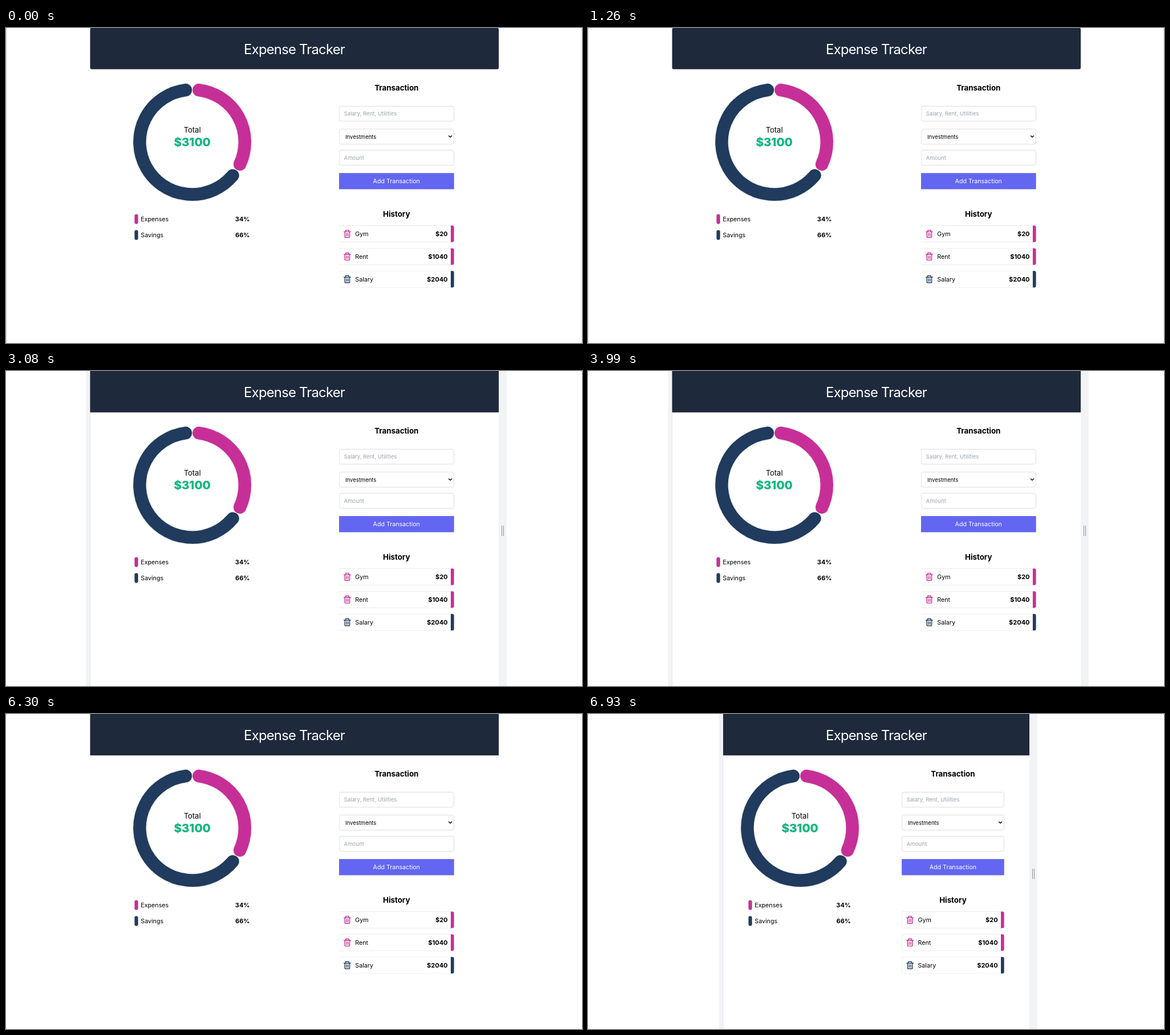
Animation of 1010 by 554 pixels, one loop 8000 ms. Source, as an HTML page:

```html
<!DOCTYPE html>
<html lang="en">
<head>
<meta charset="utf-8">
<title>Expense Tracker</title>
<style>
  html, body { margin: 0; width: 100%; height: 100%; overflow: hidden; background: #888; }
  svg { display: block; width: 1010px; height: 554px; }
  text { font-family: Inter, Roboto, sans-serif; font-optical-sizing: none; fill: #000; }
  .lift { filter: drop-shadow(0 .7px .7px rgba(0, 0, 0, .3)); }
  .ring { filter: drop-shadow(0 .7px .6px rgba(0, 0, 0, .32)); }
</style>
</head>
<body>
<svg id="stage" viewBox="0 0 1010 554"></svg>
<script>
const LOOP = 8000;
const PINK = '#c62f97', NAVY = '#203b5d', GREEN = '#10b981', HINT = '#9ca3af';
const RING = { cy: 200.5, r: 92.2, width: 22.5, gap: 7.3 };
const CENTER = 505.6;

// left/right page edges, ring centre, legend span, form span
const WIDE = { left: 147.5, right: 864, ring: 326.6, legend: [225.5, 427.5], form: [584, 785.5] };
const NARROW = { left: 237, right: 774, ring: 371.6, legend: [281.5, 461], form: [550.2, 729.6] };

const SHARES = [['Expenses', 34, PINK], ['Savings', 66, NAVY]];
const HISTORY = [['Gym', '$20', PINK], ['Rent', '$1040', PINK], ['Salary', '$2040', NAVY]];
const TRASH = 'M5 20a2 2 0 0 0 2 2h10a2 2 0 0 0 2-2V8h2V6h-4V4a2 2 0 0 0-2-2H9a2 2 0 0 0-2 2v2H3v2h2z' +
  'M9 4h6v2H9zM7 8h10v12H7zM9 10h2v8H9zM13 10h2v8h-2z';

const stage = document.getElementById('stage');

const rect = (x, y, w, h, fill, extra = '') =>
  `<rect x="${x}" y="${y}" width="${w}" height="${h}" fill="${fill}" ${extra}/>`;

const text = (s, x, y, size, { anchor = 'start', weight = 400, fill = '#000', spacing = 0 } = {}) =>
  `<text x="${x}" y="${y}" font-size="${size}" text-anchor="${anchor}" font-weight="${weight}"
    style="fill:${fill};letter-spacing:${spacing}px">${s}</text>`;

function arc(cx, from, to) {
  const point = deg => {
    const a = deg * Math.PI / 180;
    return `${cx + RING.r * Math.sin(a)} ${RING.cy - RING.r * Math.cos(a)}`;
  };
  return `M${point(from)}A${RING.r} ${RING.r} 0 ${to - from > 180 ? 1 : 0} 1 ${point(to)}`;
}

function doughnut(cx) {
  let start = 0, under = '', over = '';
  for (const [, share, color] of SHARES) {
    const end = start + share * 3.6;
    const d = arc(cx, start + RING.gap, end - RING.gap);
    under += `<path d="${d}" stroke="#fff" stroke-width="${RING.width + 2.4}"/>`;
    over += `<path d="${d}" stroke="${color}" stroke-width="${RING.width}"/>`;
    start = end;
  }
  return `<g fill="none" stroke-linecap="round"><g class="ring">${under}</g>${over}</g>` +
    text('Total', cx, 184, 13, { anchor: 'middle' }) +
    `<g class="lift">${text('$3100', cx, 208, 20.5, { anchor: 'middle', weight: 800, fill: GREEN })}</g>`;
}

function legend([x, right]) {
  return SHARES.map(([name, share, color], i) => {
    const y = 327.5 + i * 28;
    return rect(x, y, 6, 17, color, 'rx="2.8" class="lift"') +
      text(name, x + 10.8, y + 12.5, 10.7) +
      text(share + '%', right, y + 12.5, 11, { anchor: 'end', weight: 700 });
  }).join('');
}

function form([x, right]) {
  const w = right - x, mid = x + w / 2;
  const heading = (s, y) => text(s, mid, y, 13.3, { anchor: 'middle', weight: 700 });
  const field = y => rect(x + .35, y, w - .7, 26, '#fff', 'rx="3" stroke="#e5e7eb" stroke-width=".7" class="lift"');
  const row = ([name, amount, color], i) => {
    const y = 347.5 + i * 39.9;
    return rect(x, y, w, 29, '#fff', 'rx="2.5" class="lift"') +
      `<path d="M${right - 5.6} ${y}h2.8a2.8 2.8 0 0 1 2.8 2.8v23.4a2.8 2.8 0 0 1-2.8 2.8h-2.8z" fill="${color}"/>` +
      `<path d="${TRASH}" transform="translate(${x + 6} ${y + 6}) scale(.7)" fill="${color}" fill-rule="evenodd"/>` +
      text(name, x + 28.3, y + 18.4, 10.7) +
      text(amount, right - 11, y + 18.4, 11, { anchor: 'end', weight: 700 });
  };
  return heading('Transaction', 109.7) +
    field(137.7) + text('Salary, Rent, Utilities', x + 8.6, 154, 9.6, { fill: HINT }) +
    field(178) + text('Investments', x + 11, 194.5, 9.5) +
    `<path d="M${right - 9.4} 189.2l2.9 2.9 2.9-2.9" fill="none" stroke="#000" stroke-width="1.4"/>` +
    field(215.2) + text('Amount', x + 8.6, 231.7, 9.6, { fill: HINT }) +
    rect(x, 255.2, w, 28.2, '#6366f1', 'class="lift"') +
    text('Add Transaction', mid, 273.4, 10.65, { anchor: 'middle', fill: '#fff' }) +
    heading('History', 331.6) + HISTORY.map(row).join('');
}

// Resize strips either side of the page, with a grip on the right
function gutters({ left, right }, opacity) {
  const grip = x => rect(right + x, 272, 1, 18, '#8f9399');
  return `<g opacity="${opacity}">` +
    rect(left - 7.3, 0, 7.3, 554, '#f2f3f5') + rect(left - .5, 0, .8, 554, '#e0e2e5') +
    rect(right, 0, 13.6, 554, '#f2f3f5') + grip(5) + grip(8) + '</g>';
}

function page(layout, framed, strips) {
  const { left, right } = layout;
  const edges = framed ? '' : rect(.4, 0, 1, 554, '#d2d4d6') + rect(1009, 0, 1, 554, '#e4e5e7');
  return rect(0, 0, 1010, 554, '#fff', 'rx="1.5"') + edges +
    (strips ? gutters(layout, strips) : '') +
    rect(left, framed ? 0 : -.3, right - left, 72.8, '#1e293b', framed ? '' : 'rx="3"') +
    text('Expense Tracker', CENTER, 45.5, 23.8, { anchor: 'middle', fill: '#fff', spacing: -.75 }) +
    doughnut(layout.ring) + legend(layout.legend) + form(layout.form);
}

// Start time, layout, device frame shown, gutter opacity
const SCENES = [
  [0, WIDE, false, 0],
  [3010, WIDE, true, .5],
  [3080, WIDE, true, 1],
  [6160, WIDE, true, .67],
  [6230, WIDE, true, .33],
  [6300, WIDE, true, 0],
  [6370, NARROW, true, 1],
];

let shown;
function update(now) {
  const t = now % LOOP;
  const scene = SCENES.filter(s => s[0] <= t).pop();
  if (scene !== shown) {
    stage.innerHTML = page(...scene.slice(1));
    shown = scene;
  }
}

const begin = performance.now();
function tick() {
  update(performance.now() - begin);
  requestAnimationFrame(tick);
}
tick();
</script>
</body>
</html>
```
